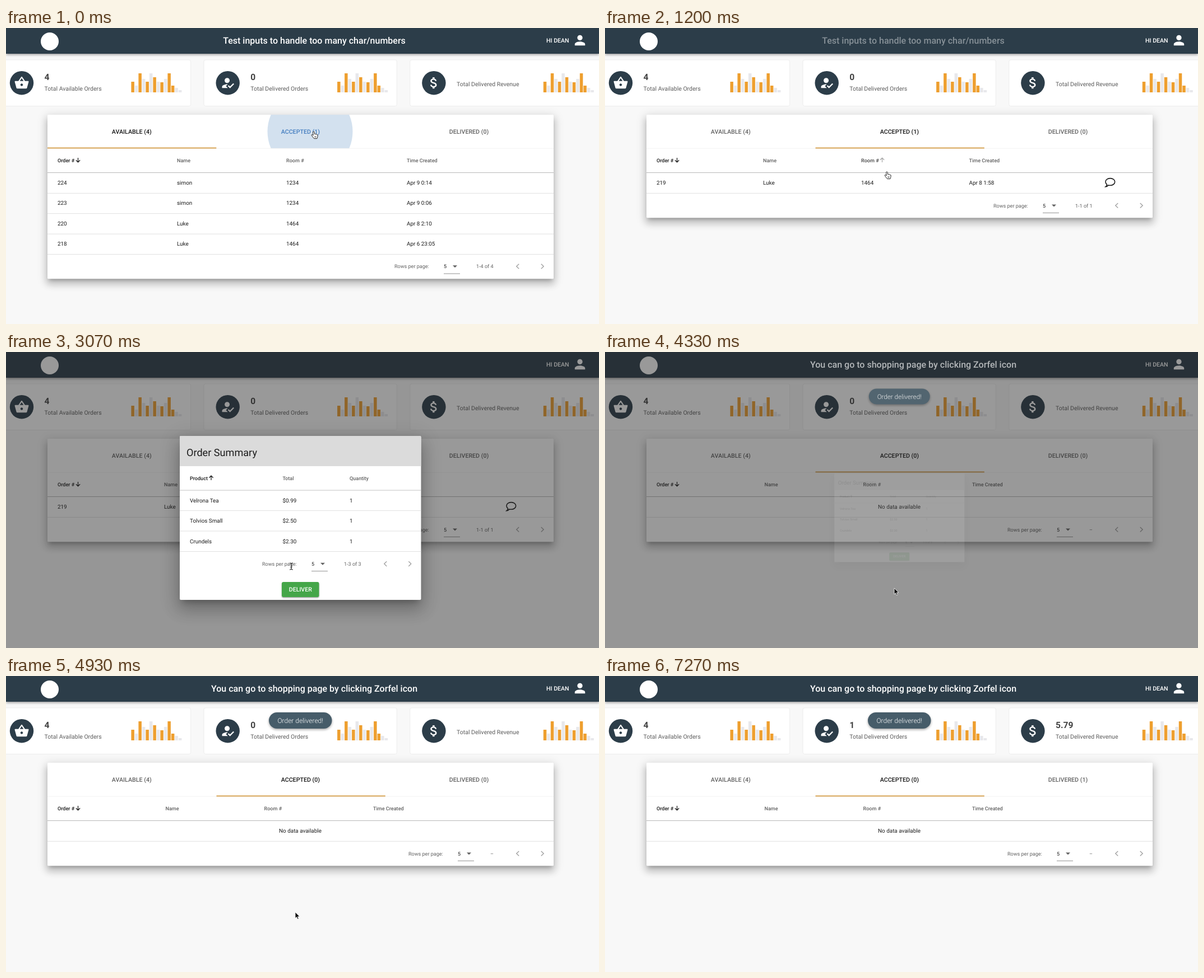
These frames come from a looping animation (1058x529 px, 7340 ms). An HTML page:

```html
<!DOCTYPE html>
<html lang="en">
<head>
<meta charset="utf-8">
<title>Order dashboard</title>
<style>
html, body { margin: 0; width: 100%; height: 100%; overflow: hidden; background: #f8f8f8; }
svg { display: block; width: 100vw; height: 100vh; font-family: Roboto, Arial, sans-serif; text-rendering: geometricPrecision; }
</style>
</head>
<body>
<svg id="stage" viewBox="0 0 1058 529" xmlns="http://www.w3.org/2000/svg"></svg>
<script>
const LOOP = 7340;
const NAVY = '#2c3d49', GREY = '#616161', INK = '#1c1c1c', ORANGE = '#ee9f2f';

// ---------- markup helpers ----------
// y is the middle of the capital letters
const text = (x, y, s, size = 9.9, weight = 400, fill = INK, extra = '') =>
  `<text x="${x}" y="${(y + size * 0.355).toFixed(2)}" font-size="${size}" font-weight="${weight}" fill="${fill}" ${extra}>${s}</text>`;
const rect = (x, y, w, h, fill, extra = '') =>
  `<rect x="${x}" y="${y}" width="${w}" height="${h}" fill="${fill}" ${extra}/>`;
const path = (d, extra) => `<path d="${d}" ${extra}/>`;
const stroke = (d, color, width) => path(d, `fill="none" stroke="${color}" stroke-width="${width}"`);
const icon = (d, x, y, scale) =>
  path(d, `fill="#fff" transform="translate(${x} ${y}) scale(${scale}) translate(-12 -12)"`);
const middle = 'text-anchor="middle"';

// each layer: drop, spread, blur, opacity
const RAISED = [[5, -3, 3, .22], [9, 1.5, 6.4, .15], [4, 3, 8.3, .12]];
const FLOATING = [[8, -5, 5.5, .24], [18, 2, 14, .17], [7, 6, 17, .13]];
const shadow = (layers, x, y, w, h, cls = '') => layers.map(([dy, grow, blur, alpha]) =>
  rect(x - grow, y + dy - grow, w + 2 * grow, h + 2 * grow, '#000',
    `class="${cls}" data-grow="${grow}" opacity="${alpha}" style="filter:blur(${blur}px)"`)).join('');

const sortArrow = (x, y, up, color = INK) => {
  const k = up ? -1 : 1;
  return stroke(`M${x} ${y - 4 * k}V${y + 3.6 * k}M${x - 3.6} ${y + .2 * k}L${x} ${y + 3.8 * k}L${x + 3.6} ${y + .2 * k}`, color, 1.25);
};

const chevron = (x, y, dir) =>
  stroke(`M${x - 2.2 * dir} ${y - 4.3}L${x + 2.2 * dir} ${y}L${x - 2.2 * dir} ${y + 4.3}`, '#a2a2a2', 1.4);

const footer = (x, y, range, prev, next) =>
  text(x, y, 'Rows per page:', 9.07, 400, GREY) +
  text(x + 88, y, '5', 9.07, 400, INK) +
  path(`M${x + 104} ${y - 1.8}h8l-4 4z`, `fill="${GREY}"`) +
  rect(x + 88, y + 12.6, 29, .9, '#858585') +
  text(x + 146, y, range, 9.07, 400, GREY) +
  chevron(prev, y, -1) + chevron(next, y, 1);

const pageTable = (cols, rows) => {
  const bottom = 258.5 + 36.4 * rows.length;
  const heads = ['Order #', 'Name', 'Room #', 'Time Created'].map((s, i) =>
    text(cols[i], 236.5, s, 9.07, 500, i ? GREY : INK, i === 2 ? 'class="room"' : '')).join('');
  const cells = rows.map((row, r) =>
    row.map((s, i) => text(cols[i], 276.3 + 36.4 * r, s)).join('') +
    rect(74, 258.5 + 36.4 * (r + 1), 903, .8, '#dadada')).join('');
  return heads + sortArrow(128.5, 236, false) + rect(74, 258, 903, 1, '#b9b9b9') + cells +
    { toString: () => '' } .toString() + `<g data-bottom="${bottom}"></g>`;
};

// ---------- header and cards ----------
const PERSON = 'M12 12c2.21 0 4-1.79 4-4s-1.79-4-4-4-4 1.79-4 4 1.79 4 4 4zm0 2c-2.67 0-8 1.34-8 4v2h16v-2c0-2.66-5.33-4-8-4z';
const BASKET = 'M17.21 9l-4.38-6.56c-.19-.28-.51-.42-.83-.42-.32 0-.64.14-.83.43L6.79 9H2c-.55 0-1 .45-1 1 0 .09.01.18.04.27l2.54 9.27c.23.84 1 1.46 1.92 1.46h13c.92 0 1.69-.62 1.93-1.46l2.54-9.27L23 10c0-.55-.45-1-1-1h-4.79zM9 9l3-4.4L15 9H9zm3 8c-1.1 0-2-.9-2-2s.9-2 2-2 2 .9 2 2-.9 2-2 2z';
const CHECKED = 'M9 17l3-2.94c-.39-.04-.68-.06-1-.06-2.67 0-8 1.34-8 4v2h9l-3-3zm2-5c2.21 0 4-1.79 4-4s-1.79-4-4-4-4 1.79-4 4 1.79 4 4 4zM15.47 20.5L12 17l1.4-1.41 2.07 2.08 5.13-5.17 1.4 1.41z';
const DOLLAR = 'M11.8 10.9c-2.27-.59-3-1.2-3-2.15 0-1.09 1.01-1.85 2.7-1.85 1.78 0 2.44.85 2.5 2.1h2.21c-.07-1.72-1.12-3.3-3.21-3.81V3h-3v2.16c-1.94.42-3.5 1.68-3.5 3.61 0 2.31 1.91 3.46 4.7 4.13 2.5.6 3 1.48 3 2.41 0 .69-.49 1.79-2.7 1.79-2.06 0-2.87-.92-2.98-2.1h-2.2c.12 2.19 1.76 3.42 3.68 3.83V21h3v-2.15c1.95-.37 3.5-1.5 3.5-3.55 0-2.84-2.43-3.81-4.7-4.4z';

const header =
  rect(0, 2, 1058, 46, '#000', 'opacity=".35" style="filter:blur(2px)"') +
  rect(0, 0, 1058, 46, NAVY) +
  '<circle cx="78" cy="24" r="16" fill="#fff"/>' +
  text(964, 22, 'HI DEAN', 10.6, 500, '#fff') +
  icon(PERSON, 1024, 22, 1.15);

const BARS = [19, 12, 34, 24, 19, 34, 27, 19, 18, 24, 34, 12, 8, 4];
const bars = x => BARS.map((h, i) =>
  rect(x + 6.5 * i, 115 - h, 5.5, h, (i % 2 === 0 && i < 12) || i === 11 ? ORANGE : '#e8e8eb')).join('');

const card = (i, glyph, label, id) => {
  const x = 367.7 * i;
  return rect(x - 14.6, 57, 344.2, 82.5, '#fff', 'rx="3" stroke="#ebebeb" stroke-width=".9"') +
    `<circle cx="${x + 28}" cy="98.2" r="21.2" fill="${NAVY}"/>` + icon(glyph, x + 28, 98.2, 1.13) +
    text(x + 68.6, 87.7, i ? '' : '4', 15.6, 700, '#424242', `id="${id}"`) +
    text(x + 68.6, 108, label, 10.5, 400, '#5c5c5c', `id="${id}Label"`) +
    bars(x + 223.4);
};

const cards = card(0, BASKET, 'Total Available Orders', 'available') +
  card(1, CHECKED, 'Total Delivered Orders', 'delivered') +
  card(2, DOLLAR, 'Total Delivered Revenue', 'revenue');

// ---------- panel ----------
const WIDE = [92, 305, 500, 715], ACCEPTED = [92, 282, 457, 649.5], EMPTY = [92, 284.5, 460.5, 655];

const availableTable = pageTable(WIDE, [
  ['224', 'simon', '1234', 'Apr 9 0:14'],
  ['223', 'simon', '1234', 'Apr 9 0:06'],
  ['220', 'Luke', '1464', 'Apr 8 2:10'],
  ['218', 'Luke', '1464', 'Apr 6 23:05']
]) + footer(693, 426, '1-4 of 4', 913, 957);

const bubble = stroke('M893.2 283.6c1.5-1.2 2.2-2.4 2.4-3.8c-1.6-1.4-2.6-3.1-2.6-4.9c0-3.7 3.8-6.3 8.3-6.3s8.4 2.6 8.4 6.3s-3.9 6.4-8.4 6.4c-1.1 0-2.1-.1-3-.4c-1.4 1.5-3.2 2.6-5.1 2.7z', INK, 1.6);

const acceptedTable = rect(74, 258.8, 903, 36, '#eee', 'id="rowHover" opacity="0"') +
  pageTable(ACCEPTED, [['219', 'Luke', '1464', 'Apr 8 1:58']]) +
  `<g id="roomArrow">${sortArrow(494.5, 236, true, '#a8a8a8')}</g>` + bubble +
  footer(693, 317.3, '1-1 of 1', 913, 957);

const emptyTable = pageTable(EMPTY, [[]]) +
  text(525, 276.3, 'No data available', 9.9, 400, INK, middle) +
  footer(718, 317.3, '–', 913, 957);

const tab = (x, id) => text(x, 185.2, '', 10.65, 500, GREY, `${middle} id="${id}"`);

const panel = shadow(RAISED, 74, 155, 903, 293, 'grow') +
  rect(74, 155, 903, 293, '#fff', 'class="grow" data-grow="0" rx="1.5"') +
  '<g clip-path="url(#tabClip)"><circle id="ripple" cx="542.5" cy="185" fill="#2668b0"/></g>' +
  rect(74, 214.8, 903, .8, '#f1f1f1') +
  tab(224.3, 'tab0') + tab(525.4, 'tab1') + tab(826, 'tab2') +
  rect(74, 213.5, 301.3, 1.9, '#d6a14f', 'id="slider"') +
  `<g clip-path="url(#panelClip)"><g id="table0">${availableTable}</g>` +
  `<g id="table1">${acceptedTable}</g><g id="table2">${emptyTable}</g></g>`;

// ---------- dialog ----------
const PRODUCTS = [['Velrona Tea', '$0.99'], ['Tolvios Small', '$2.50'], ['Crundels', '$2.30']];
const rowTop = i => 247.2 + 36.4 * i;

const dialog = shadow(FLOATING, 310, 150, 430.5, 293) +
  rect(310, 150, 430.5, 293, '#fff', 'rx="2"') +
  path('M310 204V152q0-2 2-2H738.5q2 0 2 2V204z', 'fill="#dbdbdb"') +
  text(322, 179.8, 'Order Summary', 18.1) +
  text(328, 225.3, 'Product', 9.07, 500) + sortArrow(366, 225, true) +
  text(493.5, 225.3, 'Total', 9.07, 500, GREY) + text(613, 225.3, 'Quantity', 9.07, 500, GREY) +
  rect(310, 246.6, 430.5, 1, '#c4c4c4') +
  PRODUCTS.map(([name, price], i) =>
    rect(310, rowTop(i) + .4, 430.5, 36, '#eee', `id="product${i}"`) +
    text(328, rowTop(i) + 18, name) + text(493.5, rowTop(i) + 18, price) + text(613, rowTop(i) + 18, '1') +
    rect(310, rowTop(i + 1) - .4, 430.5, .8, '#dadada')).join('') +
  footer(457, 378.6, '1-3 of 3', 677, 720.5) +
  rect(492, 412.5, 66.5, 27, '#000', 'rx="3" opacity=".35" style="filter:blur(1.3px)"') +
  rect(492, 411, 66.5, 27, '#45a649', 'rx="3"') +
  text(525.3, 424.4, 'DELIVER', 10.6, 500, '#fff', middle);

const toast = rect(469, 67, 112.5, 29, '#000', 'rx="14.5" opacity=".35" style="filter:blur(2px)"') +
  rect(469, 65, 112.5, 29, '#465c69', 'rx="14.5"') +
  text(525.2, 79.8, 'Order delivered!', 12, 300, '#fff', middle);

// ---------- pointers, drawn with the hot spot at 0,0 ----------
const outlined = (fill, edge, w) => `fill="${fill}" stroke="${edge}" stroke-width="${w}" stroke-linejoin="round"`;
const pointers =
  `<g id="arrow">${path('M0 0V11L2.5 8.7L4.3 12.6L6.2 11.8L4.5 8H8z', outlined('#111', '#fff', .8))}</g>` +
  `<g id="hand">${path('M-1.4 .6q1.3-1.4 2.4 0l.7 4l2 .1l1.9 .5l1.5 .8l-.2 3.4l-1 3.2h-5.3l-2.9-3.7l-1.7-2.6q.4-1.4 1.8-.6l1.4 1.2z', outlined('#fff', '#222', 1))}` +
  `${stroke('M2 8v3M3.8 8v3', '#222', .7)}</g>` +
  `<g id="beam">${stroke('M-3-6q2 0 3 1.2q1-1.2 3-1.2M0-5V5M-3 6q2 0 3-1.2q1 1.2 3 1.2M-1.5 2h3', '#222', 1.1)}</g>`;

const stage = document.getElementById('stage');
stage.innerHTML =
  '<defs><clipPath id="tabClip"><rect x="375.5" y="155" width="300.5" height="60"/></clipPath>' +
  '<clipPath id="panelClip"><rect class="grow" data-grow="0" x="74" y="155" width="903" height="293"/></clipPath></defs>' +
  rect(0, 0, 1058, 529, '#f8f8f8') + cards + header + panel +
  rect(0, 0, 1058, 529, '#212121', 'id="scrim"') +
  text(550, 22.7, '', 16, 500, '#fff', `${middle} id="title"`) +
  `<g id="dialog">${dialog}</g><g id="toast">${toast}</g><g id="pointer">${pointers}</g>`;

// ---------- motion ----------
const $ = id => document.getElementById(id);
const set = (id, name, value) => $(id).setAttribute(name, value);
const show = (id, on) => set(id, 'visibility', on ? 'visible' : 'hidden');
const write = (id, s) => { if ($(id).textContent !== s) $(id).textContent = s; };
const ramp = (t, a, b) => Math.min(1, Math.max(0, (t - a) / (b - a)));
const mix = (a, b, k) => a + (b - a) * k;
const smooth = k => k * k * (3 - 2 * k);
const growing = [...document.querySelectorAll('.grow')];
const roomHead = document.querySelector('#table1 .room');

const bezier = (x1, y1, x2, y2) => k => {
  const at = (a, b, s) => 3 * (1 - s) ** 2 * s * a + 3 * (1 - s) * s * s * b + s ** 3;
  let lo = 0, hi = 1;
  for (let i = 0; i < 24; i++) {
    const mid = (lo + hi) / 2;
    if (at(x1, x2, mid) < k) lo = mid; else hi = mid;
  }
  return at(y1, y2, lo);
};
const swift = bezier(.25, .8, .5, 1), pop = bezier(.25, .8, .25, 1);

const blend = (from, to, k) => `rgb(${from.map((v, i) => Math.round(mix(v, to[i], k)))})`;
const BLUE = [66, 124, 191], DARK = [22, 22, 22], DIM = [97, 97, 97];

// time, x, y
const TRAIL = [[0, 549, 185], [550, 549, 186], [1200, 503, 257], [1500, 490, 277], [2600, 490, 277],
  [3070, 509, 383], [3450, 516, 422], [4930, 516, 422], [5560, 519, 78], [LOOP, 519, 78]];
function pointerAt(t) {
  const i = Math.max(1, TRAIL.findIndex(p => p[0] >= t));
  const [t0, x0, y0] = TRAIL[i - 1], [t1, x1, y1] = TRAIL[i];
  const k = smooth(ramp(t, t0, t1));
  return [mix(x0, x1, k), mix(y0, y1, k)];
}
// share of the last 120 ms that the pointer spent between two heights
function hover(t, top, bottom) {
  let hits = 0;
  for (let i = 0; i < 12; i++) {
    const y = pointerAt(Math.max(0, t - i * 10))[1];
    if (y > top && y <= bottom) hits++;
  }
  return hits / 12;
}

function draw(t) {
  // tab change
  const slide = swift(ramp(t, 140, 440));
  const bottom = mix(448.3, 339.3, slide);
  for (const el of growing) el.setAttribute('height', bottom - 155 + 2 * el.dataset.grow);
  set('slider', 'x', mix(74, 375.5, slide));
  set('table0', 'transform', `translate(${-903 * slide})`);
  set('table1', 'transform', `translate(${903 * (1 - slide)})`);
  set('ripple', 'r', mix(76, 172, ramp(t, 70, 240)));
  set('ripple', 'opacity', .2 * (1 - ramp(t, 200, 460)));
  set('tab0', 'fill', blend(DARK, DIM, slide));
  set('tab1', 'fill', blend(BLUE, DARK, ramp(t, 140, 440)));

  // order data
  const sent = t >= 4300, counted = t >= 5740;
  show('table0', slide < 1);
  show('table1', slide > 0 && !sent);
  show('table2', sent);
  write('tab0', 'AVAILABLE (4)');
  write('tab1', sent ? 'ACCEPTED (0)' : 'ACCEPTED (1)');
  write('tab2', counted ? 'DELIVERED (1)' : 'DELIVERED (0)');
  write('delivered', counted ? '1' : '0');
  write('revenue', counted ? '5.79' : '');
  set('revenueLabel', 'y', (counted ? 108 : 100) + 3.73);

  // hover states
  const [x, y] = pointerAt(t);
  const overRoom = t > 600 && y > 215 && y < 258.5;
  set('roomArrow', 'opacity', overRoom ? 1 : 0);
  roomHead.setAttribute('fill', overRoom ? '#444' : GREY);
  set('rowHover', 'opacity', t < 2080 ? hover(t, 258.5, 295) : 0);
  for (let i = 0; i < 3; i++) set('product' + i, 'opacity', hover(t, rowTop(i), rowTop(i + 1)));

  // dialog and scrim
  const open = pop(ramp(t, 2031, 2331)) * (1 - pop(ramp(t, 4190, 4490)));
  show('dialog', open > .002);
  set('dialog', 'opacity', open);
  set('dialog', 'transform', `translate(525.25 296.5) scale(${.5 + .5 * open}) translate(-525.25 -296.5)`);
  set('scrim', 'opacity', .46 * (ramp(t, 2100, 2400) - ramp(t, 4330, 4630)));

  // caption
  write('title', t < 2600 ? 'Test inputs to handle too many char/numbers'
    : 'You can go to shopping page by clicking Zorfel icon');
  set('title', 'opacity', t < 2600 ? 1 - ramp(t, 800, 1500) : ramp(t, 3750, 4640));

  // toast
  const pop2 = pop(ramp(t, 4260, 4460));
  set('toast', 'opacity', pop2);
  set('toast', 'transform', `translate(525.2 79.5) scale(${.8 + .2 * pop2}) translate(-525.2 -79.5)`);

  // pointer
  const kind = t < 2080 || (t > 3250 && t < 4320) ? 'hand' : t > 2990 && t < 3160 ? 'beam' : 'arrow';
  for (const id of ['arrow', 'hand', 'beam']) set(id, 'display', id === kind && t < 6600 ? 'inline' : 'none');
  set('pointer', 'transform', `translate(${x} ${y})`);
}

const start = performance.now();
function tick() {
  draw((performance.now() - start) % LOOP);
  requestAnimationFrame(tick);
}
tick();
</script>
</body>
</html>
```
